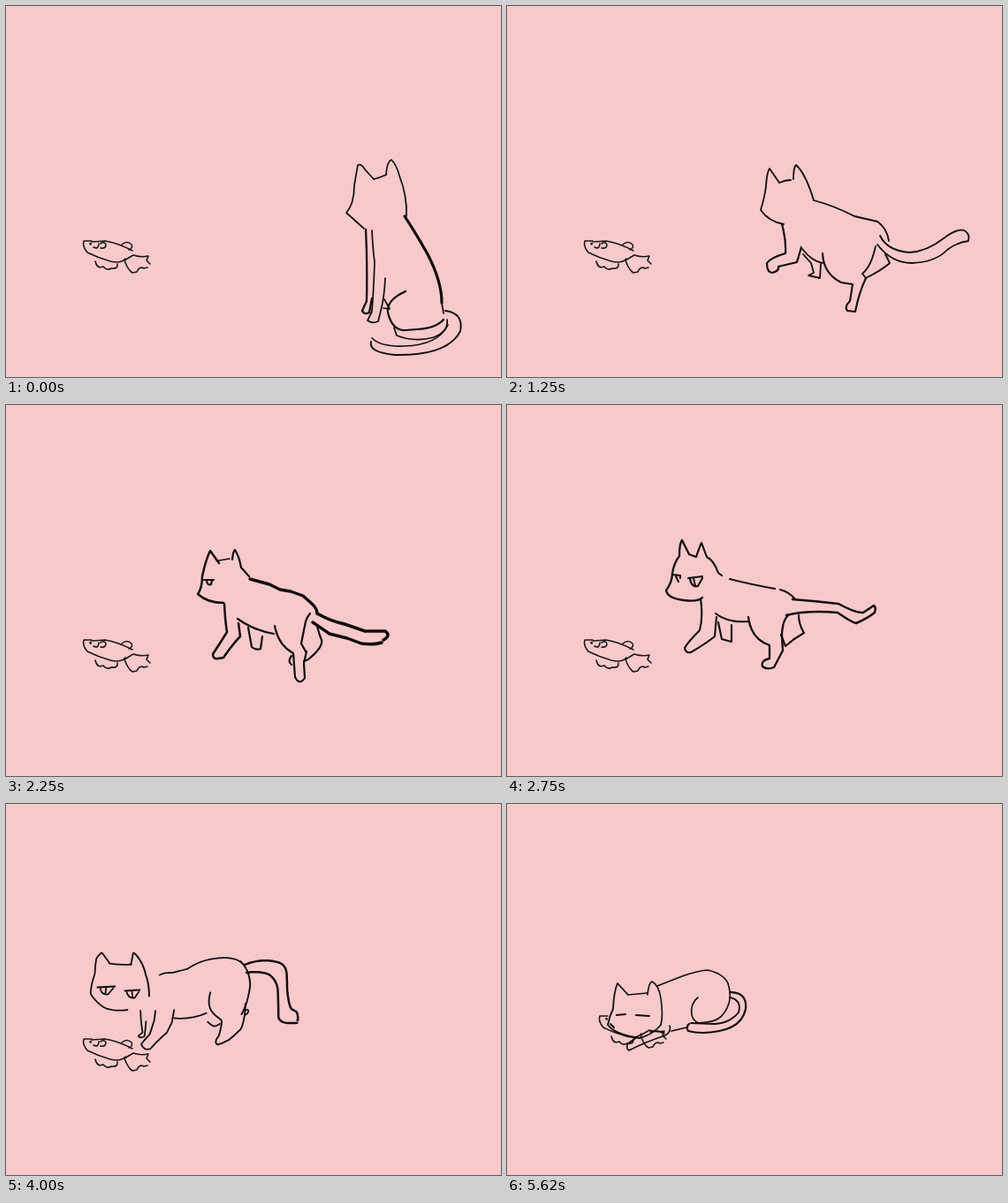
Animation of 560x420 px, one loop 6000 ms. Source, as an HTML page:

```html
<!DOCTYPE html>
<html lang="en">
<head>
<meta charset="utf-8">
<title>Cat and fish</title>
<style>
  html, body { margin: 0; width: 100%; height: 100%; overflow: hidden; background: #f7c9ca; }
  svg { display: block; width: 100vw; height: 100vh; }
  path { fill: none; stroke-linecap: round; stroke-linejoin: round; }
</style>
</head>
<body>
<svg id="stage" viewBox="0 0 560 420">
  <g id="fish" stroke="#1c1617" stroke-width="1.6"></g>
  <g id="cat" stroke="#120d0e"></g>
</svg>
<script>
const LOOP = 6000, LAST = 45, N = 56;

// Each pose: step on the 8-per-second clock, line weight, heavier parts, strokes.
const poses = [
  { at: 0, w: 1.7, bold: { back: 3.2, hindA: 2.2, legA: 2.3, tail: 1.9 }, parts: {
    face: 'M405 252L385 234Q394 224 394 203L398 180Q402 178 406 185L416 196',
    crown: 'M416 196Q424 194 430 191',
    ear: 'M430 191Q431 176 436 174Q442 180 445 192Q454 215 453 238',
    back: 'M451 238Q466 261 477 281Q493 312 493 336',
    rump: 'M493 336L495 348',
    legA: 'M407 253Q409 290 408 334L403 345Q405 350 411 347L414 331',
    legB: 'M414 254Q415 275 417 290Q416 320 414 346L409 356Q414 360 421 357L424 345Q428 330 429 308',
    belly: 'M428 332L434 343L427 342',
    hindA: 'M452 323Q430 333 432 347Q437 368 452 367L465 366Q486 365 495 355',
    hindB: 'M439 364L442 373Q462 381 484 375Q501 368 499 355',
    tail: 'M497 345Q518 348 514 368Q500 396 440 395Q410 392 413 380',
    tail2: 'M500 361Q489 384 450 385Q424 386 414 376' } },

  { at: 10, w: 1.8, bold: { legA: 2.2, hindA: 2.1 }, parts: {
    face: 'M313 247Q296 244 287 231Q292 214 293 204Q294 188 297 184L308 200',
    crown: 'M308 200Q315 197 321 197',
    ear: 'M324 196Q324 183 327 180Q338 190 347 220',
    back: 'M347 220Q370 226 393 238L419 244',
    rump: 'M419 244Q430 252 432 266',
    legA: 'M311 247Q316 265 315 280Q298 285 294 291Q294 302 300 302Q308 300 307 295L328 290L333 273',
    legB: 'M335 281L344 291L347 302L341 305L354 308L355 292',
    belly: 'M334 275Q345 289 357 291',
    hindA: 'M357 280Q358 303 378 313L391 315L388 334Q381 341 385 345L394 346Q398 325 406 308',
    hindB: 'M417 272Q412 295 402 303L406 308Q424 299 433 291L428 281',
    tail: 'M422 260Q430 277 455 279Q475 278 494 263Q508 252 517 254Q524 258 522 265',
    tail2: 'M419 270Q435 291 458 291Q485 290 498 276Q508 268 522 266' } },

  { at: 18, w: 2.2, bold: { back: 3.4, tail: 3.5, tail2: 3.4, legA: 2.5, face: 2.5, crown: 1.6 }, parts: {
    face: 'M246 224Q228 224 217 214Q222 207 222 194Q226 175 231 165L241 179',
    crown: 'M241 176L253 174',
    ear: 'M256 175Q257 165 259 164Q264 172 266 184L275 194',
    back: 'M276 197L298 203L310 209L322 211L336 216L345 224Q352 230 352 236',
    rump: 'M344 236Q339 242 338 250L334 270L339 279',
    legA: 'M247 225Q248 245 250 257Q242 270 234 282Q234 288 240 287L246 286Q257 270 265 262L263 247',
    legB: 'M274 252L278 274Q283 278 288 276L290 262',
    belly: 'M262 242Q280 255 303 259',
    hindA: 'M304 250Q308 272 325 281L327 308Q332 318 338 309L337 292L340 279',
    hindB: 'M352 250Q354 259 357 266Q359 274 342 288L337 290',
    tail: 'M352 236Q368 245 383 248L406 256L429 256Q436 261 427 266',
    tail2: 'M347 246L366 259L386 264L402 270Q415 272 425 269',
    pad: 'M323 284Q318 290 323 294' },
    eyes: 'M224 198L235 198M227 199Q228 205 232 203L233 198' },

  { at: 22, w: 2.1, bold: { tail: 2.5, tail2: 2.5, face: 2.3, hindA: 2.3 }, parts: {
    face: 'M221 218Q217 223 200 221Q182 219 180 210Q187 200 187 191Q189 178 195 171Q195 157 198 153L206 169',
    crown: 'M206 169L214 172',
    ear: 'M214 172Q218 160 220 156L226 172Q234 176 239 190L243 193',
    back: 'M252 197Q275 203 303 208',
    rump: 'M309 209Q320 212 326 220',
    legA: 'M219 219Q222 240 218 255Q205 268 201 275Q202 281 208 280Q225 270 235 262L237 240',
    legB: 'M239 246L243 265L254 268L254 249',
    belly: 'M236 236Q250 247 274 245',
    hindA: 'M273 240Q276 265 297 272L297 287Q287 289 289 296Q294 300 302 297L312 278L311 262Q311 245 318 238',
    hindB: 'M330 238Q330 248 336 258Q325 264 315 273L310 260',
    tail: 'M323 220Q350 222 375 225Q395 236 403 235L415 227Q418 230 416 234',
    tail2: 'M316 238Q340 232 374 235Q390 246 395 247Q407 242 416 235' },
    eyes: 'M188 192L196 193L196 196M191 194L194 200M205 196L221 194M207 197Q209 207 216 205L221 196M211 196L213 205' },

  { at: 28, w: 1.9, bold: { tail: 3.1, tail2: 3.1, hindA: 2.1, ear: 2.2 }, parts: {
    face: 'M175 213Q160 218 146 217Q118 211 114 203Q116 188 122 178Q122 160 128 142L137 157',
    crown: 'M137 158Q150 161 165 160',
    ear: 'M166 160L168 145Q180 158 183 177Q188 190 187 203',
    back: 'M187 181L193 180L203 183Q230 179 251 176Q275 172 282 182',
    rump: 'M278 177Q289 187 290 205Q288 225 281 240',
    legA: 'M174 223Q174 245 172 257L159 269Q160 279 170 279Q178 268 190 255L196 222',
    legB: 'M148 219Q153 245 158 257L151 263Q156 268 165 262L173 232',
    belly: 'M196 237Q215 242 236 235',
    hindA: 'M232 218Q233 240 250 247L266 252Q262 265 245 278Q242 286 251 285L262 275Q275 265 283 256L284 222',
    hindB: 'M247 248Q254 258 262 253',
    tail: 'M283 183Q300 178 318 190Q335 207 350 240L353 247L358 243',
    tail2: 'M285 193Q310 195 323 215Q330 232 334 245Q340 251 356 249',
    pad: 'M283 234Q290 231 287 237L284 239' },
    eyes: 'M128 191L148 190M131 191Q132 200 140 199L146 192M138 191L137 198M159 195L176 194M161 196Q163 204 170 203L175 196M167 195L168 203' },

  { at: 37, w: 1.6, bold: { rump: 2, legA: 1.8 }, parts: {
    face: 'M118 261Q106 258 100 250Q99 244 103 235Q103 215 105 199Q115 204 122 212',
    crown: 'M122 212L140 212',
    ear: 'M140 213L144 199Q154 206 158 222L160 238',
    jaw: 'M159 246Q152 256 143 261',
    back: 'M155 211Q168 202 187 195Q197 173 222 173Q240 172 250 182',
    rump: 'M248 180Q261 195 255 215Q252 228 246 235',
    legA: 'M162 250L159 258Q148 265 144 276L150 278Q164 266 180 260L182 249',
    legB: 'M158 255L145 264Q141 268 138 266',
    belly: 'M182 250Q200 247 214 239',
    hindA: 'M230 207Q212 218 213 231Q214 243 230 247L223 257Q222 262 232 261L248 247Q253 240 252 232',
    hindB: 'M202 245L209 248L214 243',
    tail: 'M251 181Q275 167 296 166Q310 167 306 180L292 204Q285 226 290 232L300 230Q302 240 296 244L290 246',
    tail2: 'M254 188Q270 181 281 182Q290 188 287 200Q278 222 272 237Q271 245 280 246L292 246' },
    eyes: 'M109 235L120 236M112 236Q112 243 117 243L119 236M115 236L115 242M131 237L147 237M133 238Q136 247 142 245L145 238M139 238L139 245' },

  { at: 45, w: 1.6, bold: { tail: 2.2, tail2: 1.9, face: 1.8, eyes: 2 }, parts: {
    face: 'M150 265Q122 261 114 250Q116 240 120 232Q121 212 125 203L137 216',
    crown: 'M137 216L159 214',
    ear: 'M159 216Q160 203 164 201Q172 205 174 220Q177 240 174 250',
    jaw: 'M174 250Q165 261 150 265',
    back: 'M170 206L198 195Q215 189 227 188Q245 192 250 203',
    rump: 'M250 203Q256 222 246 236Q240 246 225 247',
    legA: 'M184 251Q186 258 179 262Q155 270 138 279Q134 276 137 271L147 264',
    legB: 'M162 258Q170 255 178 260',
    belly: 'M186 257L203 253',
    hindA: 'M216 219Q207 226 209 239Q211 246 217 248L225 247',
    tail: 'M252 213Q272 213 270 232Q266 252 240 257Q220 261 205 257Q202 252 206 249',
    tail2: 'M252 219Q266 222 262 236Q252 248 235 249L208 248' },
    eyes: 'M124 239L134 238M146 239L161 240M117 249L121 253' }
];

const fishParts = {
  body: 'M97 266L88 266Q86 272 92 279Q104 285 118 289Q130 292 135 286',
  eye: 'M95.5 269L95.8 269.4',
  fin: 'M101 289Q103 298 110 295Q114 300 119 297Q127 298 126 292',
  tail: 'M134 288L144 282Q153 285 161 283L159 288L163 292M134 288Q138 299 143 302L148 301Q151 294 156 297L160 296',
  gill: 'M99 273Q105 276 105 269M107 269Q111 266 113 270Q113 275 107 274',
  top: 'M97 267L112 266Q126 268 143 277M131 270Q137 265 142 270Q144 274 139 276'
};

const headParts = ['face', 'crown', 'ear', 'jaw', 'eyes'];
const lateParts = ['tail', 'tail2', 'hindA', 'hindB', 'rump'];
const mix = (a, b, u) => a + (b - a) * u;
const clamp = x => Math.min(1, Math.max(0, x));
const smooth = x => x * x * (3 - 2 * x);

function makePath(parent, d) {
  const el = document.createElementNS('http://www.w3.org/2000/svg', 'path');
  if (d) el.setAttribute('d', d);
  if (parent) parent.appendChild(el);
  return el;
}

function sample(d) {
  const el = makePath(null, d), len = el.getTotalLength();
  return Array.from({ length: N }, (_, i) => {
    const p = el.getPointAtLength(len * i / (N - 1));
    return [p.x, p.y];
  });
}

function centre(points) {
  return [0, 1].map(i => points.reduce((s, p) => s + p[i], 0) / N);
}

const names = new Set();
for (const p of poses) {
  p.points = {};
  for (const key in p.parts) {
    p.points[key] = sample(p.parts[key]);
    names.add(key);
  }
  if (p.eyes) p.parts.eyes = p.eyes;
  p.head = centre(p.points.face);
  p.hip = centre(p.points.rump);
}
names.add('eyes');

const cat = document.getElementById('cat'), fish = document.getElementById('fish');
const catEls = {}, fishEls = {};
for (const key of names) catEls[key] = makePath(cat);
for (const key in fishParts) fishEls[key] = makePath(fish, fishParts[key]);
fishEls.eye.setAttribute('stroke-width', 2.6);

const weight = (pose, key) => (pose.bold && pose.bold[key]) || pose.w;

function morph(a, b, u) {
  return 'M' + a.map((p, i) =>
    mix(p[0], b[i][0], u).toFixed(1) + ' ' + mix(p[1], b[i][1], u).toFixed(1)).join('L');
}

function drawPart(key, a, b, seg, raw) {
  const el = catEls[key], onHead = headParts.includes(key);
  let u = raw, dx = 0, dy = 0, d;
  if (seg === 0 && lateParts.includes(key)) {
    u = raw ** 3;
    if (key.startsWith('tail')) dx = 38 * Math.sin(Math.PI * u);
  }
  if (seg === 4) {
    u = smooth(raw);
    if (onHead) dx = -14 * Math.sin(Math.PI * raw);
  }
  if (u === 0 || u === 1) {
    d = (u ? b : a).parts[key];
  } else if (a.points[key] && b.points[key]) {
    d = morph(a.points[key], b.points[key], u);
  } else {
    // Strokes without a partner ride along with the head or the hip.
    const anchor = onHead ? 'head' : 'hip', v = u < .5 ? u : u - 1;
    d = (u < .5 ? a : b).parts[key];
    dx += (b[anchor][0] - a[anchor][0]) * v;
    dy += (b[anchor][1] - a[anchor][1]) * v;
  }
  el.setAttribute('d', d || '');
  el.setAttribute('transform', `translate(${dx.toFixed(1)} ${dy.toFixed(1)})`);
  el.setAttribute('stroke-width', mix(weight(a, key), weight(b, key), u).toFixed(2));
}

function drawFish(k) {
  const nudge = clamp((k - 35) / 2), lift = smooth(clamp((k - 37) / 3));
  fish.setAttribute('transform', `translate(${nudge + 16 * lift} ${-6 * nudge - 20 * lift})`);
  // The upper side vanishes into the cat's mouth.
  fishEls.top.style.display = fishEls.gill.style.display = k < 39 ? '' : 'none';
}

function render(time) {
  const t = time % LOOP;
  const k = Math.min(LAST, Math.floor((Math.floor(t / 10) + .5) / 12.5));
  let seg = 0;
  while (seg < poses.length - 2 && k >= poses[seg + 1].at) seg++;
  const a = poses[seg], b = poses[seg + 1], u = (k - a.at) / (b.at - a.at);
  for (const key of names) drawPart(key, a, b, seg, u);
  drawFish(k);
}

function tick() {
  render(performance.now());
  requestAnimationFrame(tick);
}
tick();
</script>
</body>
</html>
```
